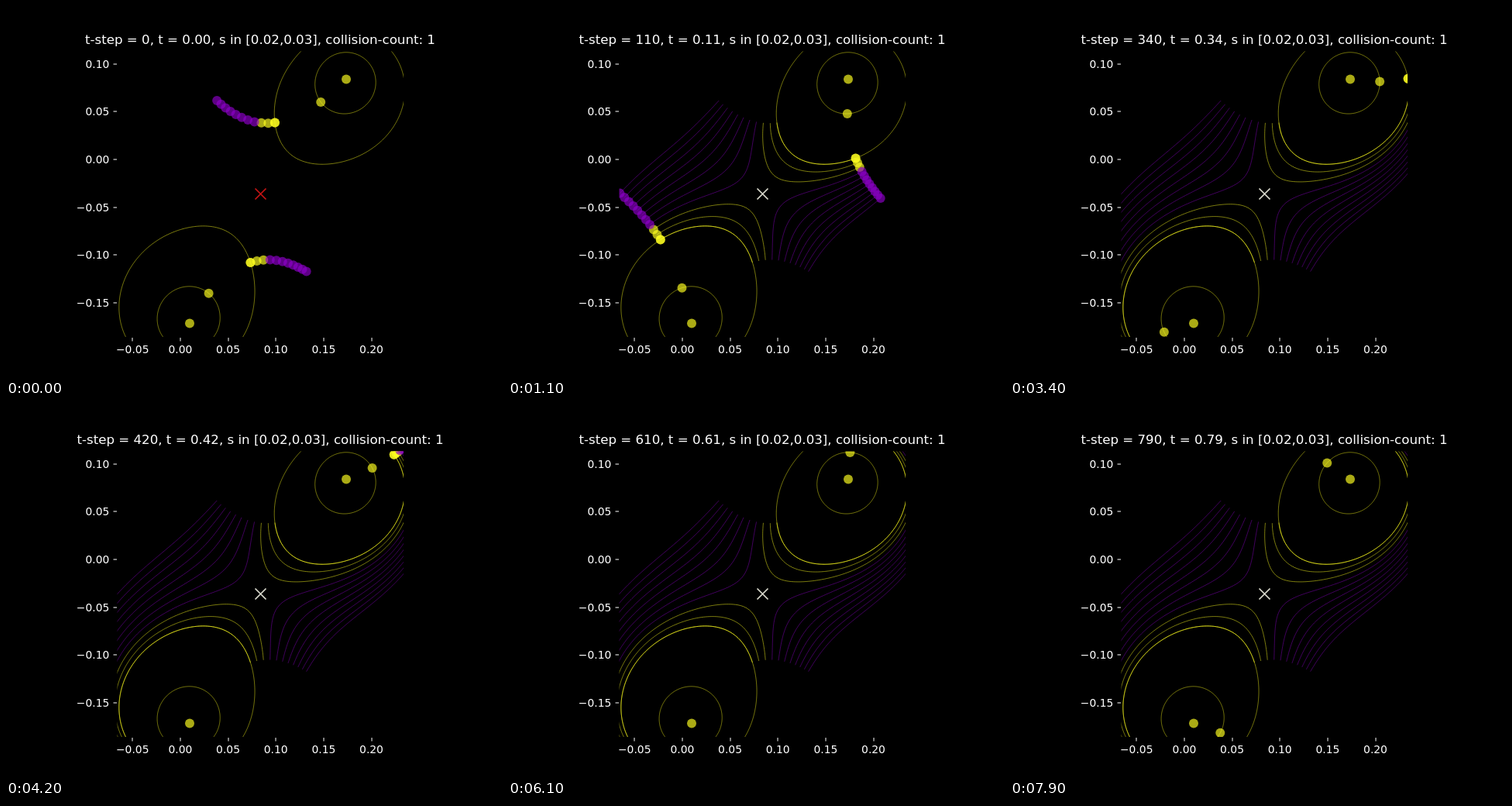
Write an HTML page with a canvas that moves like this. It is 640 by 480 pixels and loops after 8 s.

```html
<!DOCTYPE html>
<html lang="en">
<head>
<meta charset="utf-8">
<title>Colliding roots</title>
<style>
  html, body { margin: 0; height: 100%; overflow: hidden; background: #000; }
  canvas { display: block; }
</style>
</head>
<body>
<canvas id="stage" width="640" height="480"></canvas>
<script>
const ctx = document.getElementById('stage').getContext('2d');
const YELLOW = '#ffff20', PURPLE = '#8c00c8';
const FONT = '"DejaVu Sans", sans-serif';
const TURN = 1000;

// The two roots are middle(p) ± sqrt(square(p)), with complex p = s·exp(2πit).
// Coefficients run from the constant term up, in pixels with y pointing up.
const MIDDLE = [[338, -252], [-4.8, 3.7], [0.7, 0.95]];
const SQUARE = [[-14605, 31815], [5654, -13302], [-966, -744], [-92, 76]];

function evaluate(coefficients, [px, py]) {
  return coefficients.reduceRight(([x, y], [cx, cy]) =>
    [x * px - y * py + cx, x * py + y * px + cy], [0, 0]);
}

function squareRoot([x, y]) {
  const r = Math.hypot(x, y), half = Math.atan2(y, x) / 2;
  return [Math.sqrt(r) * Math.cos(half), Math.sqrt(r) * Math.sin(half)];
}

// Paths of both roots over one turn of p, each followed without jumps
function rootPaths(s) {
  const first = [], second = [];
  let last = [0, 1];
  for (let k = 0; k <= TURN; k++) {
    const a = 2 * Math.PI * k / TURN;
    const p = [s * Math.cos(a), s * Math.sin(a)];
    const [mx, my] = evaluate(MIDDLE, p);
    let [dx, dy] = squareRoot(evaluate(SQUARE, p));
    if (dx * last[0] + dy * last[1] < 0) [dx, dy] = [-dx, -dy];
    last = [dx, dy];
    first.push([mx + dx, -my - dy]);
    second.push([mx - dx, -my + dy]);
  }
  return [first, second];
}

const hubs = rootPaths(0), rings = rootPaths(1), orbits = rootPaths(2);
const yellowPaths = [2.1, 2.2].flatMap(rootPaths);
const purplePaths = Array.from({ length: 8 }, (_, i) => rootPaths(2.3 + i / 10)).flat();

function trail(path, end, color, alpha, width = 0.7) {
  ctx.beginPath();
  for (let k = 0; k <= end; k++) ctx.lineTo(...path[k]);
  ctx.strokeStyle = color;
  ctx.globalAlpha = alpha;
  ctx.lineWidth = width;
  ctx.stroke();
}

function dot([x, y], color) {
  ctx.globalAlpha = 0.67;
  ctx.fillStyle = color;
  ctx.beginPath();
  ctx.arc(x, y, 6, 0, 2 * Math.PI);
  ctx.fill();
}

function text(str, x, y, size, align) {
  ctx.font = `${size}px ${FONT}`;
  ctx.textAlign = align;
  ctx.fillText(str, x, y);
}

function drawAxes(step) {
  ctx.globalAlpha = 1;
  ctx.fillStyle = '#fff';
  const label = v => v.toFixed(2).replace('-', '\u2212');
  for (let i = -1; i <= 4; i++) {
    const x = 224.9 + i * 61.65;
    ctx.fillRect(Math.round(x) - 0.5, 428, 1, 4.5);
    text(label(i * 0.05), x, 448, 13.89, 'center');
  }
  for (let i = -3; i <= 2; i++) {
    const y = Math.round(197.9 - i * 61.65);
    ctx.fillRect(138.5, y - 0.5, 4.5, 1);
    text(label(i * 0.05), 133.3, y + 5, 13.89, 'right');
  }
  text(`t-step = ${step}, t = ${(step / 1000).toFixed(2)}, s in [0.02,0.03], collision-count: 1`,
    328, 49, 16.65, 'center');
}

function drawCross(color) {
  ctx.globalAlpha = 1;
  ctx.strokeStyle = color;
  ctx.lineWidth = 1.7;
  ctx.beginPath();
  for (const d of [-7, 7]) {
    ctx.moveTo(328.5 - d, 235.5);
    ctx.lineTo(328.5 + d, 249.5);
  }
  ctx.stroke();
}

function draw(step) {
  ctx.globalAlpha = 1;
  ctx.fillStyle = '#000';
  ctx.fillRect(0, 0, 640, 480);
  drawAxes(step);

  ctx.save();
  ctx.beginPath();
  ctx.rect(143.5, 58.5, 369.5, 368.5);
  ctx.clip();

  for (const path of [...rings, ...orbits]) trail(path, TURN, YELLOW, 0.7);
  for (const path of orbits) trail(path, step, YELLOW, 0.8, 0.8);
  for (const path of yellowPaths) trail(path, step, YELLOW, 0.7);
  for (const path of purplePaths) trail(path, step, PURPLE, 0.67);

  drawCross(step ? '#dcdcd0' : '#c81414');

  // The outer orbits carry two dots each, which makes them brighter
  for (const path of [...hubs, ...rings, ...orbits, ...orbits, ...yellowPaths]) dot(path[step], YELLOW);
  for (const path of purplePaths) dot(path[step], PURPLE);
  ctx.restore();
}

const start = performance.now();
let shown = -1;
function tick() {
  const step = Math.floor((performance.now() - start) % 8000 / 100) * 10;
  if (step !== shown) draw(shown = step);
  requestAnimationFrame(tick);
}
tick();
</script>
</body>
</html>
```
